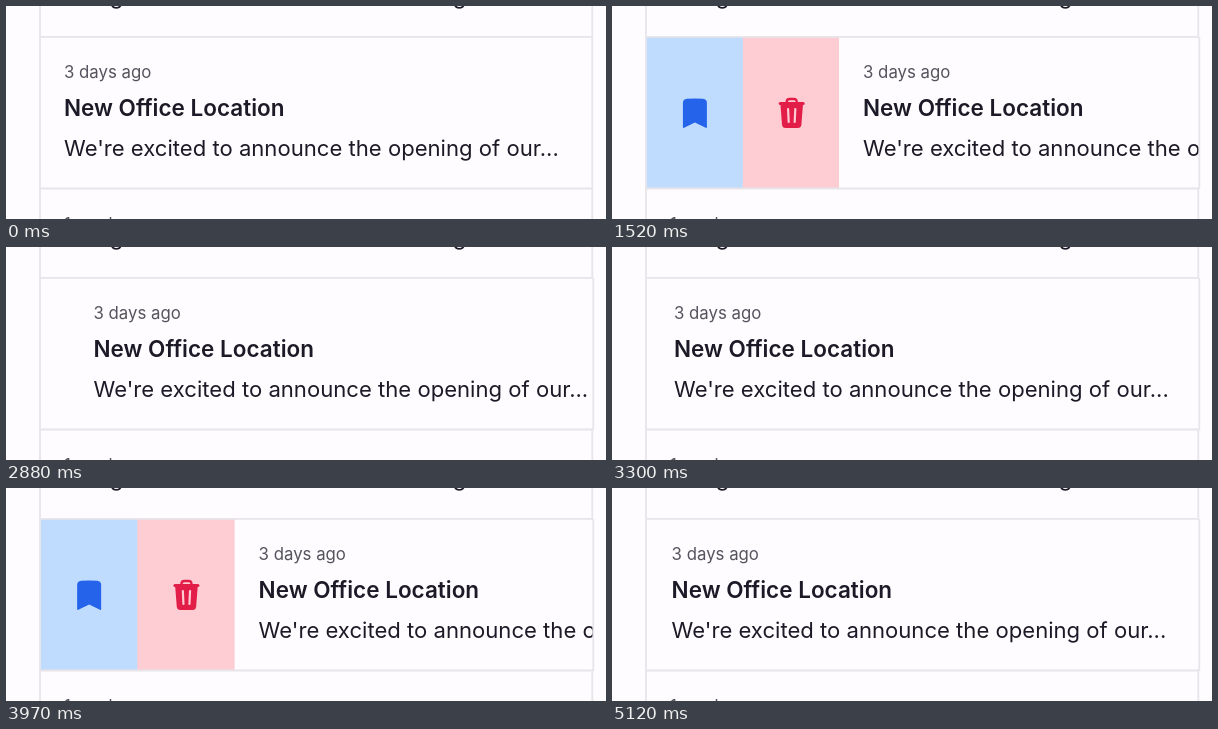
An HTML page that plays this animation: 600x213 px, repeating every 5150 ms.

```html
<!DOCTYPE html>
<html lang="en">
<head>
<meta charset="utf-8">
<title>Swipe actions</title>
<style>
  @property --x { syntax: "<number>"; inherits: true; initial-value: 0; }

  html, body { margin: 0; width: 100%; height: 100%; overflow: hidden; background: #fefcfe; }

  .stage {
    --w: max(96.8px, var(--x) * .5px);
    display: block; width: 600px; height: 213px;
    font-family: Inter, sans-serif; font-size: 22.1px;
    animation: swipe 5150ms infinite;
  }

  text { fill: #1b1a26; }
  .date { font-size: 16.8px; fill: #55545e; }
  .title { font-weight: 600; font-size: 22.5px; }
  .lines { fill: none; stroke: #e7e5ea; stroke-width: 1.8; }

  .panel { fill: #fefcfe; }
  .slide { transform: translateX(calc(var(--x) * 1px)); }
  /* fades in while the row travels from 50 to 100 px */
  .actions { opacity: calc((var(--x) - 50) / 50); }
  .save { fill: #bfdbfe; width: var(--w); }
  .remove { fill: #fecdd3; }
  .bookmark { fill: #2563eb; transform: translate(calc(var(--w) / 2 + .5px), 76px); }
  .trash { fill: #e11d48; transform: translate(calc(var(--w) * 1.5 + .5px), 76px); }
  .handle { fill: none; stroke: #e11d48; stroke-width: 2.4; }
  .slots { fill: none; stroke: #fecdd3; stroke-width: 2.2; stroke-linecap: round; }
  .edge { transform: translateX(min(1px, var(--x) * 1px)); }

  /* open, stretch past the stop, close, open again, close */
  @keyframes swipe {
    0%, 17.28% { --x: 0; animation-timing-function: cubic-bezier(.4, .1, .6, .92); }
    21.17% { --x: 179; animation-timing-function: cubic-bezier(.15, .6, .4, 1); }
    27.57%, 29.5% { --x: 193; animation-timing-function: cubic-bezier(.4, .05, .5, 1); }
    46.4%, 48.2% { --x: 289; animation-timing-function: cubic-bezier(.4, 0, .65, .9); }
    56.3% { --x: 25; animation-timing-function: cubic-bezier(.15, .6, .4, 1); }
    64.08%, 64.5% { --x: 4; animation-timing-function: cubic-bezier(.4, .1, .6, .92); }
    68.5% { --x: 182; animation-timing-function: cubic-bezier(.15, .6, .4, 1); }
    77%, 83.5% { --x: 194.6; animation-timing-function: cubic-bezier(.4, .05, .6, .9); }
    89.4% { --x: 14; animation-timing-function: cubic-bezier(.15, .6, .4, 1); }
    99.42%, 99.99% { --x: 1.6; animation-timing-function: step-end; }
    100% { --x: 0; }
  }
</style>
</head>
<body>
<svg class="stage" viewBox="0 0 600 213">
  <text x="58" y="-2">Things we learned from these meetings</text>
  <text class="date" x="58" y="224">1 week ago</text>

  <svg x="34" y="31" width="553" height="151">
    <g class="actions">
      <rect class="remove" width="553" height="151"/>
      <rect class="save" height="151"/>
      <path class="bookmark" d="M-12 14V-10Q-12-13.8-8-14.2Q0-15 8-14.2Q12-13.8 12-10V14Q12 15.4 10.8 14.8L0 9.5L-10.8 14.8Q-12 15.4-12 14Z"/>
      <g class="trash">
        <path class="handle" d="M-5-10V-11Q-5-14-2-14H2Q5-14 5-11V-10"/>
        <rect x="-13" y="-11" width="26" height="3" rx="1.5"/>
        <path d="M-11.3-9H11.3L9.7 11.5Q9.4 15 6 15H-6Q-9.4 15-9.7 11.5Z"/>
        <path class="slots" d="M-3.6-4L-3 9M3.6-4L3 9"/>
      </g>
    </g>
    <g class="slide">
      <rect class="panel" width="560" height="151"/>
      <text class="date" x="24" y="41.3">3 days ago</text>
      <text class="title" x="24" y="79">New Office Location</text>
      <text x="24" y="119.3">We're excited to announce the opening of our...</text>
    </g>
  </svg>

  <g class="lines">
    <path d="M34 0V213M34 30.8H587M34 182.5H587M586.3 0V31M586.3 183V213"/>
    <path class="edge" d="M586.3 31V183"/>
  </g>
</svg>
</body>
</html>
```
